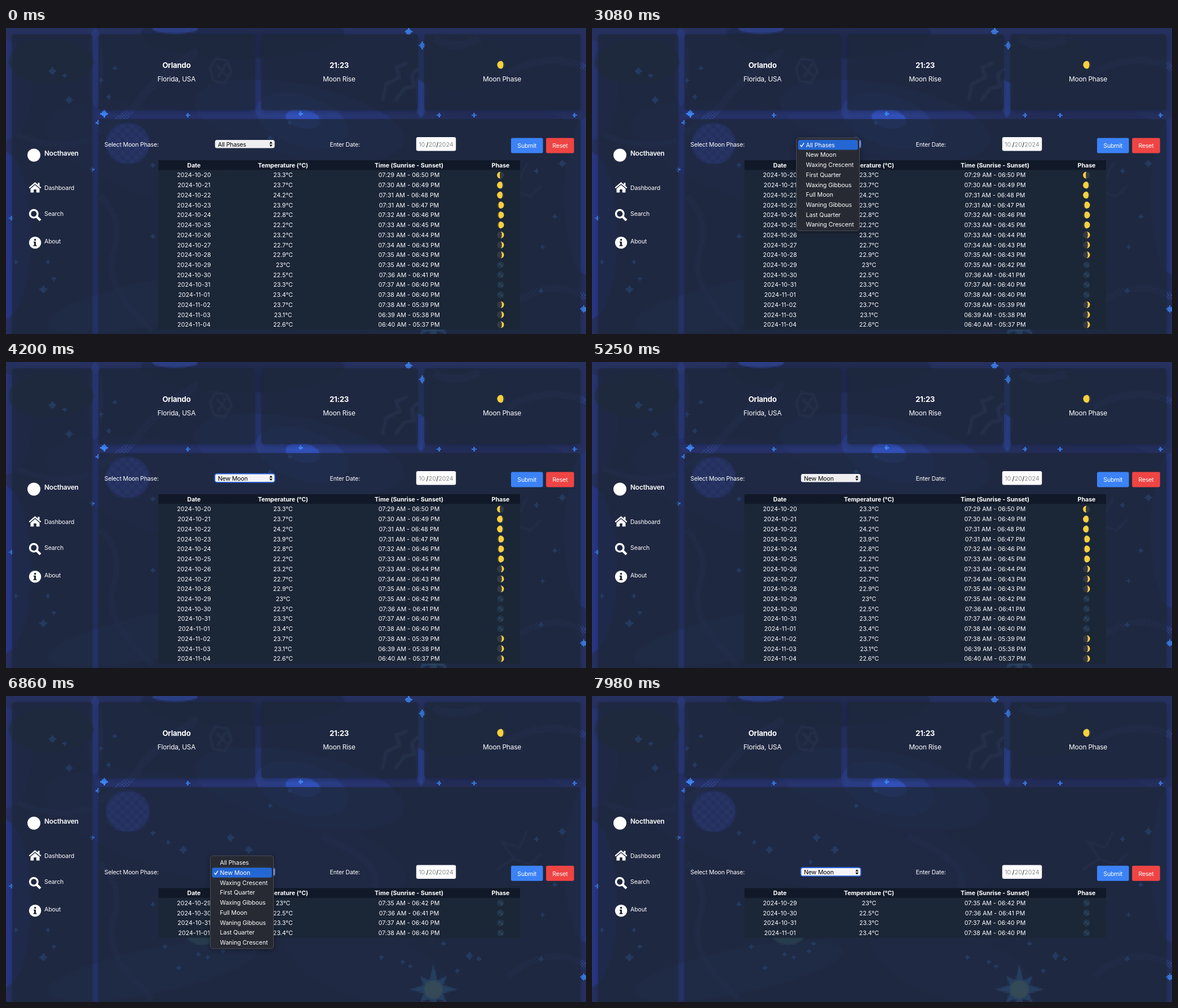
Recreate the animation shown at these times as an HTML page with a canvas. Size 1029x544 px, loop 8 s.

```html
<!DOCTYPE html>
<html lang="en">
<head>
<meta charset="utf-8">
<title>Moon dashboard</title>
<style>
  html, body { margin: 0; width: 100%; height: 100%; overflow: hidden; background: #26315f; }
  #stage { position: relative; width: 1029px; height: 544px; overflow: hidden; }
  #sky, svg { position: absolute; left: 0; top: 0; width: 1029px; height: 544px; }
  #sky { image-rendering: pixelated; }
  .panel { position: absolute; border-radius: 5px; background: rgba(28, 38, 55, .75);
           box-shadow: 0 3px 8px rgba(16, 22, 44, .4); }
  text { font: 10.63px Inter, sans-serif; letter-spacing: -.018em; fill: #fff; white-space: pre; }
  .mid { text-anchor: middle; }
  .num { letter-spacing: .004em; }
  .head { font-weight: 700; letter-spacing: -.003em; }
  .big { font-size: 13.28px; font-weight: 700; }
  .sub { font-size: 11.95px; }
  .brand { font-size: 11.95px; font-weight: 600; }
  .item { letter-spacing: -.006em; }
  .dark { fill: #000; }
  .pale { fill: #8b8b8b; letter-spacing: 0; }
  #menu { filter: drop-shadow(0 2px 4px rgba(0, 0, 0, .35)); }
  #glow { filter: blur(5px); }
</style>
</head>
<body>
<div id="stage">
  <canvas id="sky" width="381" height="202"></canvas>
  <svg id="ui" viewBox="0 0 1029 544"></svg>
</div>
<script>
const LOOP = 8000, STEP = 70, ROW = 17.72, FORM_SHIFT = 106.4, MENU_SHIFT = 88.6;
const stage = document.getElementById('stage');
const ui = document.getElementById('ui');

// ---- Pixel-art night sky, drawn once at low resolution ----
const ctx = document.getElementById('sky').getContext('2d');
const CELL = 2.7;

function blob(x, y, rx, ry, color, turn = 0) {
  ctx.fillStyle = color;
  ctx.beginPath();
  ctx.ellipse(x / CELL, y / CELL, rx / CELL, ry / CELL, turn, 0, 7);
  ctx.fill();
}
function dot(cx, cy, color) {
  ctx.fillStyle = color;
  ctx.fillRect(cx, cy, 1, 1);
}
function star(x, y, size, color) {
  const cx = Math.round(x / CELL), cy = Math.round(y / CELL);
  for (let i = -size; i <= size; i++) {
    dot(cx + i, cy, color);
    dot(cx, cy + i, color);
    if (size > 1 && i % 2) dot(cx + i, cy + i, color), dot(cx + i, cy - i, color);
  }
}
// Eight rays, the diagonal ones shorter
function burst(x, y, radius, color) {
  ctx.fillStyle = color;
  ctx.beginPath();
  for (let i = 0; i < 16; i++) {
    const r = radius * (i % 2 ? .42 : i % 4 ? .75 : 1) / CELL, a = i * Math.PI / 8;
    ctx.lineTo(x / CELL + r * Math.cos(a), y / CELL + r * Math.sin(a));
  }
  ctx.fill();
}
function curve(path, width, style) {
  ctx.save();
  ctx.scale(1 / CELL, 1 / CELL);
  ctx.lineWidth = width;
  ctx.strokeStyle = style;
  ctx.stroke(new Path2D(path));
  ctx.restore();
}
function checker(color) {
  const tile = document.createElement('canvas');
  tile.width = tile.height = 6;
  const c = tile.getContext('2d');
  c.fillStyle = color;
  c.fillRect(0, 0, 3, 3);
  c.fillRect(3, 3, 3, 3);
  return ctx.createPattern(tile, 'repeat');
}

function drawSky() {
  ctx.fillStyle = '#26315f';
  ctx.fillRect(0, 0, 381, 202);
  blob(420, 10, 180, 45, '#212b50');
  blob(900, 330, 230, 190, '#242e5a', .4);
  blob(390, 250, 330, 90, '#27336a', .25);
  blob(520, 165, 190, 65, '#293672', .2);
  blob(525, 165, 85, 45, '#2c3f86', .3);
  blob(527, 162, 32, 17, '#3352bc', .2);
  blob(-5, 370, 50, 150, '#293783');
  blob(0, 110, 45, 90, '#283570');
  blob(158, 70, 14, 70, '#2a3a78');
  blob(300, 2, 40, 8, '#2c3f84');
  blob(736, 100, 10, 60, '#2c4088');
  blob(1030, 300, 40, 140, '#283672');
  blob(260, 490, 190, 40, '#28366c', -.2);
  blob(640, 480, 150, 60, '#273468', .3);
  blob(80, 60, 75, 40, '#24334e');
  blob(800, 60, 90, 50, '#25345a');

  const dither = checker('#324588');
  curve('M165 185Q215 160 240 125T340 40M760 20Q790 40 840 20', 14, dither);
  curve('M560 250Q680 300 650 350T760 430M890 500Q960 440 1029 480M890 80Q960 40 1029 70', 12, dither);
  curve('M168 300Q210 340 190 400T260 540M20 190Q90 220 150 200', 10, dither);

  const rune = '#3a4c82';
  curve('M362 72L372 54L392 58L400 78L388 98L368 94ZM374 66L392 86M390 64L376 88', 4, rune);
  curve('M668 130L674 100L698 88L692 70L712 62M690 130L706 108L724 104L720 84L730 72', 6, rune);
  curve('M900 290L880 260L910 270L925 240M870 310L900 290L930 300L950 280', 4, '#33437e');

  blob(216, 206, 39, 37, '#3c4ed0');
  blob(216, 206, 37, 35, checker('#4a5eea'));
  blob(348, 421, 30, 23, '#447c88');

  const faint = '#3a78dc';
  [193,69, 180,122, 168,93, 103,85, 150,252, 287,258, 386,294, 466,195, 503,167, 259,243,
   258,371, 85,445, 73,417, 775,440, 702,472, 665,465, 357,464, 281,446, 340,458, 305,483,
   392,440, 383,453, 800,488, 715,480, 838,466, 947,468, 940,255, 972,335, 950,390, 322,155,
   768,153, 828,153, 1008,153, 16,415, 8,337]
    .forEach((x, i, list) => i % 2 || star(x, list[i + 1], 1, faint));
  for (const [x, y] of [[312, 274], [397, 250], [430, 274], [822, 461], [65, 464], [985, 240],
                        [738, 30], [110, 127], [80, 75], [714, 5], [1024, 500]])
    star(x, y, 2, faint);
  star(174, 151, 2, '#3f8cff');
  star(522, 151, 1, '#3f8cff');
  star(162, 168, 1, '#3f7df0');

  burst(758, 523, 44, '#4088d8');
  blob(758, 523, 17, 16, '#7ab8b8');
}

// ---- Markup helpers ----
const rect = (x, y, w, h, fill, r = 0, extra = '') =>
  `<rect x="${x}" y="${y}" width="${w}" height="${h}" rx="${r}" fill="${fill}" ${extra}/>`;
// y is the middle of the capitals
const label = (x, y, str, cls = '', size = 10.63) =>
  `<text x="${x}" y="${y + size * .364}" class="${cls}">${str}</text>`;

function moon(x, y, r, phase) {
  const [right, bulge] = { half: [0, -.2], waning: [0, .6], waxing: [1, .6], crescent: [1, -.4], dark: [] }[phase];
  const body = phase == 'dark' ? '#23354a' : '#343a44';
  let out = `<circle cx="${x}" cy="${y}" r="${r}" fill="${body}"/>`;
  if (phase == 'dark')
    out += `<path d="M${x - 3} ${y - 3}l3 1l-1 3zM${x + 1} ${y}l3 1l-2 3z" fill="#385064"/>`;
  else
    out += `<path fill="#f8d03f" d="M${x} ${y - r}A${r} ${r} 0 0 ${right} ${x} ${y + r}
      A${Math.abs(bulge) * r} ${r} 0 0 ${+((bulge > 0) == !!right)} ${x} ${y - r}"/>`;
  return out;
}

// ---- Data ----
const temps = [23.3, 23.7, 24.2, 23.9, 22.8, 22.2, 23.2, 22.7, 22.9, 23, 22.5, 23.3, 23.4, 23.7, 23.1, 22.6];
const rises = '07:29 07:30 07:31 07:31 07:32 07:33 07:33 07:34 07:35 07:35 07:36 07:37 07:38 07:38 06:39 06:40'.split(' ');
const sets = '06:50 06:49 06:48 06:47 06:46 06:45 06:44 06:43 06:43 06:42 06:41 06:40 06:40 05:39 05:38 05:37'.split(' ');
const phaseName = { h: 'half', g: 'waning', w: 'waxing', c: 'crescent', n: 'dark' };
const days = [...'hggwwwcccnnnnccc'].map((key, i) => ({
  date: new Date(Date.UTC(2024, 9, 20 + i)).toISOString().slice(0, 10),
  temp: temps[i] + '°C',
  time: `${rises[i]} AM - ${sets[i]} PM`,
  phase: phaseName[key],
}));
const options = ['All Phases', 'New Moon', 'Waxing Crescent', 'First Quarter', 'Waxing Gibbous',
                 'Full Moon', 'Waning Gibbous', 'Last Quarter', 'Waning Crescent'];

const tableRows = list => rect(270.5, 252.5, 641.5, list.length * ROW, '#1b2637') + list.map((day, i) => {
  const y = 261.6 + i * ROW;
  return label(333.5, y, day.date, 'mid num') + label(491.5, y, day.temp, 'mid num') +
         label(715, y, day.time, 'mid num') + moon(877.3, y, 6.2, day.phase);
}).join('');

// ---- Static page ----
function panel(x, y, w, h) {
  const div = document.createElement('div');
  div.className = 'panel';
  div.style.cssText = `left:${x}px;top:${y}px;width:${w}px;height:${h}px`;
  stage.insertBefore(div, ui);
}

function build() {
  panel(10.5, 10.5, 142, 560);
  for (const x of [164, 453, 741.7]) panel(x, 10.5, 277.5, 135.5);
  panel(164, 162, 855, 420);

  const sidebar = `
    <circle cx="49.5" cy="226" r="11.5" fill="#fff"/>
    ${label(68, 222.5, 'Nocthaven', 'brand', 11.95)}
    <path fill="#fff" d="M51.5 274L62.5 283.5L61 285.2L51.5 277.2L42 285.2L40.5 283.5ZM56.5 275.3h3v5.5l-3-2.5z
      M51.5 279L59.5 285.7V292.5H53.8V287H49.2V292.5H43.5V285.7Z"/>
    ${label(68, 284, 'Dashboard')}
    <circle cx="49.3" cy="330.3" r="6.8" fill="none" stroke="#fff" stroke-width="3.4"/>
    <path d="M54.5 335.5L61 342" stroke="#fff" stroke-width="4.2"/>
    ${label(68, 330.5, 'Search')}
    <circle cx="51.6" cy="381.6" r="10.7" fill="#fff"/>
    <path fill="#1b2536" d="M49 379.7h4v6h1.3v2h-5.6v-2h1.3v-4h-1z"/>
    <circle cx="51.6" cy="376.6" r="1.8" fill="#1b2536"/>
    ${label(68, 379.5, 'About')}`;

  const cards =
    label(302.5, 66, 'Orlando', 'mid big', 13.28) + label(302.5, 90.3, 'Florida, USA', 'mid sub', 11.95) +
    label(591, 66, '21:23', 'mid big', 13.28) + label(591, 90.3, 'Moon Rise', 'mid sub', 11.95) +
    moon(878.3, 65.5, 6.9, 'waning') + label(880, 90.3, 'Moon Phase', 'mid sub', 11.95);

  const form =
    label(174.5, 206.7, 'Select Moon Phase:') +
    rect(370.8, 199, 105.8, 14.5, '#efeff1', 3.5) +
    `<g id="ring">${rect(370.4, 198.6, 106.6, 15.2, '#f4f4f8', 3.8, 'stroke="#2c62d6" stroke-width="1.8"')}</g>
     <text id="choice" x="376" y="210.5" class="dark"></text>
     <path d="M467.3 205.4l2.7-3.6l2.7 3.6zM467.3 207.4l2.7 3.6l2.7-3.6z"/>` +
    label(574.5, 206.7, 'Enter Date:') +
    rect(727.8, 194, 70.4, 24.6, '#fff', 3) +
    label(732.3, 206.7, '10', 'pale') + label(745.5, 206.7, '/', 'dark') +
    label(749.7, 206.7, '20', 'pale') + label(763.2, 206.7, '/', 'dark') + label(767.3, 206.7, '2024', 'pale') +
    rect(896, 195.4, 56.6, 27, '#3b82f6', 2.7) + label(924.2, 209.4, 'Submit', 'mid') +
    rect(958.2, 195.4, 49.6, 27, '#ef4444', 2.7) + label(983, 209.4, 'Reset', 'mid') +
    rect(270.5, 235, 641.5, 17.7, '#111928') +
    [[333.5, 'Date'], [491.5, 'Temperature (°C)'], [715, 'Time (Sunrise - Sunset)'], [877.5, 'Phase']]
      .map(([x, str]) => label(x, 244, str, 'mid head')).join('') +
    `<g id="all">${tableRows(days)}</g><g id="filtered">${tableRows(days.filter(d => d.phase == 'dark'))}</g>`;

  // The select box shines faintly through behind the checked item
  const menu =
    rect(362.5, 195.3, 112, 165.2, '#282a33', 4.5, 'stroke="#565961" stroke-width=".8"') +
    `<g id="check">${rect(376, 200, 92, 13, '#fff', 3, 'id="glow" opacity=".07"')}</g>
     <g id="mark">${rect(365.5, 198.9, 106.2, 17.5, '#2467d4', 3)}</g>
     <path id="tick" d="M369.5 208l2.3 2.9l4.2-6.4" fill="none" stroke="#fff" stroke-width="1.4"/>` +
    options.map((str, i) => label(379.6, 207.8 + i * ROW, str, 'item')).join('');

  ui.innerHTML = `${sidebar}${cards}<g id="form">${form}</g><g id="menu">${menu}</g>`;
  // Hovered first row sits behind its text
  document.querySelector('#all rect').insertAdjacentHTML('afterend',
    `<g id="hover">${rect(270.5, 252.6, 641.5, ROW, '#374151')}</g>`);
}

// ---- Timeline ----
const part = {};
const show = (name, on) => part[name].setAttribute('visibility', on ? 'inherit' : 'hidden');
const shift = (name, y) => part[name].setAttribute('transform', `translate(0 ${y})`);
const within = (t, a, b) => t >= a && t < b;

// Each menu opens, moves its highlight, blinks it once, then fades away
const menus = [
  { open: 3080, move: 3360, pick: 3850, from: 0, to: 1, shift: 0 },
  { open: 6860, move: 7280, pick: 7630, from: 1, to: 0, shift: MENU_SHIFT },
];

function render(t) {
  const filtered = t >= 5880;
  shift('form', filtered ? FORM_SHIFT : 0);
  show('all', !filtered);
  show('filtered', filtered);
  show('hover', !filtered && within(t, 4270, 4620));
  show('ring', within(t, 3080, 5250) || t >= 6860);
  part.choice.textContent = options[t < 4200 ? 0 : 1];

  const menu = menus.find(m => within(t, m.open, m.pick + 5 * STEP));
  part.menu.style.display = menu ? '' : 'none';
  if (menu) {
    const beat = Math.floor((t - menu.pick) / STEP);
    shift('menu', menu.shift);
    shift('mark', (t < menu.move ? menu.from : menu.to) * ROW);
    shift('check', menu.from * ROW);
    shift('tick', menu.from * ROW);
    show('mark', beat != 0);
    part.menu.setAttribute('opacity', beat < 2 ? 1 : 1 - (beat - 1) / 4);
  }
}

function tick() {
  render(performance.now() % LOOP);
  requestAnimationFrame(tick);
}

drawSky();
build();
for (const el of ui.querySelectorAll('[id]')) part[el.id] = el;
tick();
</script>
</body>
</html>
```
